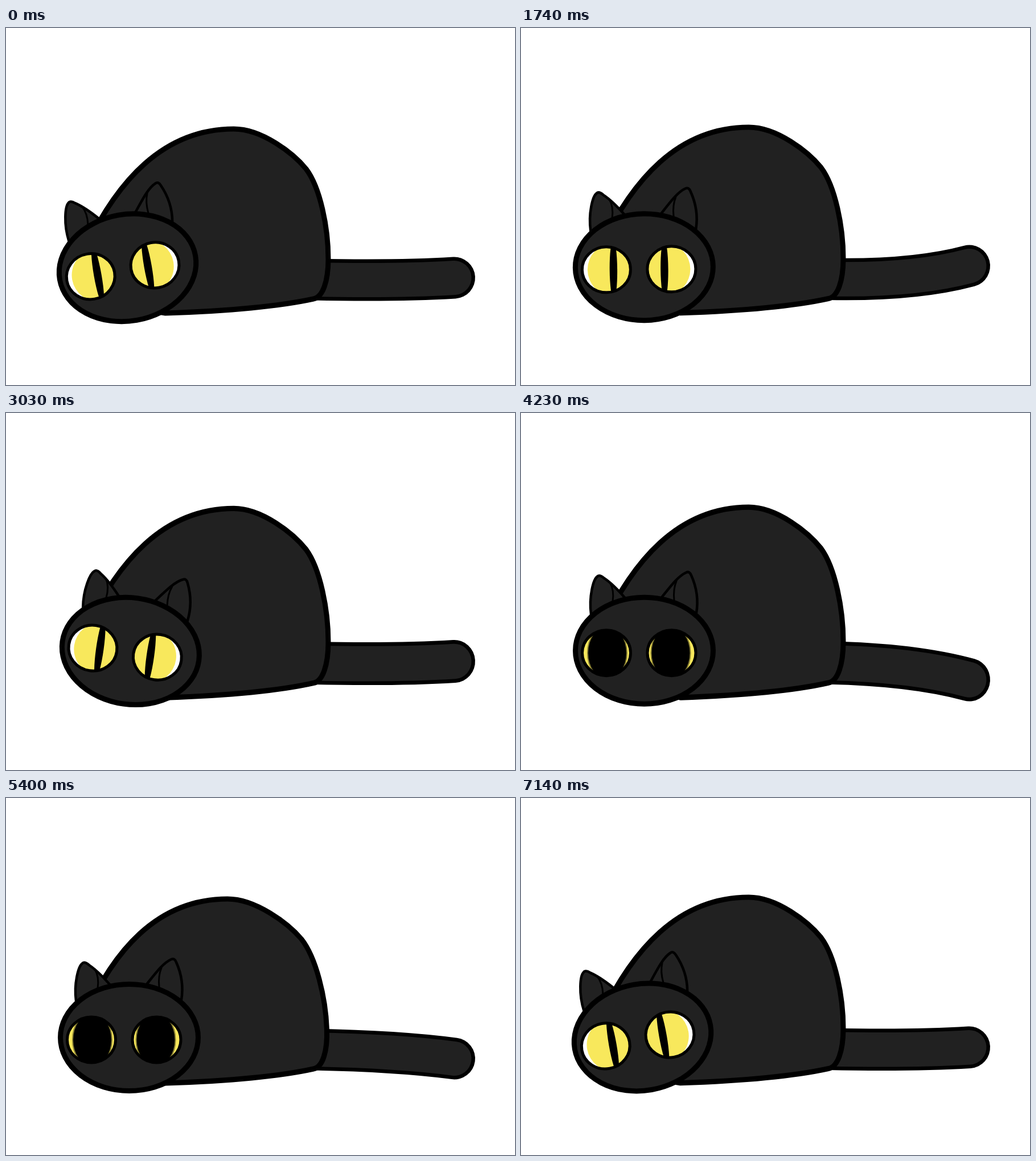
Recreate the animation shown at these times as an HTML page with a canvas. Size 894 px wide and 626 px high, loop 7200 ms.

```html
<!DOCTYPE html>
<html lang="en">
<head>
<meta charset="utf-8">
<title>Black cat</title>
<style>
html, body { margin: 0; width: 100%; height: 100%; overflow: hidden; background: #fff; }
canvas { display: block; }
</style>
</head>
<body>
<canvas id="stage" width="894" height="626"></canvas>
<script>
const ctx = document.getElementById('stage').getContext('2d');
const LOOP = 7200, STEP = 56.1, LAST = 127;
const FUR = '#212121', INK = '#000', YELLOW = '#f8e85c';

// Tracks: [step, value] pairs, eased between neighbours
const TILT = [[0, -10], [3, -10], [14, 9], [26, 9], [36, -10], [43, -10], [55, 8.3],
  [62, 8.3], [70, 0], [113, 0], [124, -10], [128, -10]];
const TAIL = [[0, 0], [10, -20], [21, 36], [32, -21], [54, 0], [62, -16], [77, 34],
  [88, -8], [102, 36], [109, 12], [117, 36], [126, 0], [128, 0]];
const PUPIL = [[0, 0], [60, 0], [69, 1], [112, 1], [121, 0], [128, 0]];

const mix = (a, b, u) => a + (b - a) * u;
const ease = u => (1 - Math.cos(Math.PI * u)) / 2;

function track(keys, k) {
  let i = 1;
  while (i < keys.length - 1 && keys[i][0] < k) i++;
  const [k0, a] = keys[i - 1], [k1, b] = keys[i];
  return mix(a, b, ease((k - k0) / (k1 - k0)));
}

// Eight steps per breath: slower rise, quicker fall
function breath(k) {
  const q = k % 8;
  return q < 4.5 ? ease(q / 4.5) : ease((8 - q) / 3.5);
}

// Side-to-side sway of the back
function sway(k) {
  return k < 76.5 || k > 115.5 ? 0 : 11 * Math.sin(2 * Math.PI * (k - 76.5) / 26);
}

function shape(path, width, fill = FUR) {
  if (fill) {
    ctx.fillStyle = fill;
    ctx.fill(path);
  }
  ctx.strokeStyle = INK;
  ctx.lineWidth = width;
  ctx.stroke(path);
}

function oval(x, y, rx, ry) {
  const p = new Path2D();
  p.ellipse(x, y, rx, ry, 0, 0, 2 * Math.PI);
  return p;
}

const body = new Path2D('M140 385 C195 270 275 177 400 177 C450 177 505 220 527 247 ' +
  'C552 280 566 350 566 405 C566 445 556 472 540 475 C480 488 400 496 280 500 L160 480 Z');
const ears = [
  ['M123 356 C119 325 127 295 134 290 Q138 286 146 293 C158 301 170 313 183 328',
    'M156 300 Q164 314 161 334'],
  ['M246 328 C262 308 276 289 290 283 Q296 280 299 288 C308 308 312 330 308 354',
    'M273 298 Q267 312 269 332']
].map(pair => pair.map(d => new Path2D(d)));
const skull = oval(216.5, 420, 121, 93.5);

function drawTail(lift) {
  const p = new Path2D();
  p.moveTo(540, 441);
  p.quadraticCurveTo(690, 444, 787.5, 438 + lift);
  for (const [color, width] of [[INK, 73], [FUR, 60]]) {
    ctx.strokeStyle = color;
    ctx.lineWidth = width;
    ctx.stroke(p);
  }
}

function drawBody(lean) {
  ctx.save();
  const skew = -lean / 300;
  ctx.transform(1, 0, skew, 1, -skew * 475, 0);
  shape(body, 9);
  ctx.restore();
}

function drawEye(x, side, open) {
  const y = 424, eye = oval(x, y, 42.5, 40);
  ctx.save();
  ctx.clip(eye);
  ctx.fillStyle = '#fff';
  ctx.fill(eye);
  ctx.fillStyle = YELLOW;
  ctx.fill(oval(x + side * 10, y, mix(43, 56, open), mix(45, 56, open)));
  const pupil = oval(x + side * mix(12.5, 1.5, open), y, mix(6.7, 33.5, open), mix(52, 46, open));
  if (open > 0) {
    ctx.strokeStyle = `rgba(0,0,0,${0.45 * open})`;
    ctx.lineWidth = 4;
    ctx.stroke(pupil);
  }
  ctx.fillStyle = INK;
  ctx.fill(pupil);
  ctx.restore();
  shape(eye, 5, null);
}

function drawHead(tilt, rise, open) {
  ctx.save();
  ctx.translate(216.5, 437 - rise);
  ctx.rotate(tilt * Math.PI / 180);
  ctx.translate(-216.5, -437);
  for (const [ear, fold] of ears) {
    shape(ear, 4.5);
    shape(fold, 3, null);
  }
  shape(skull, 9);
  drawEye(150, 1, open);
  drawEye(264.5, -1, open);
  ctx.restore();
}

function draw(time) {
  const k = Math.min(LAST, Math.floor((time % LOOP) / STEP));
  const air = breath(k);
  ctx.fillStyle = '#fff';
  ctx.fillRect(0, 0, 894, 626);
  ctx.lineCap = ctx.lineJoin = 'round';

  ctx.save();
  ctx.translate(0, 530);
  ctx.scale(1, 1 + 0.0447 * air);
  ctx.translate(0, -530);
  drawTail(track(TAIL, k));
  drawBody(sway(k));
  ctx.restore();

  drawHead(track(TILT, k), 4.4 * air, track(PUPIL, k));
}

const start = performance.now();
function tick() {
  draw(performance.now() - start);
  requestAnimationFrame(tick);
}
tick();
</script>
</body>
</html>
```
